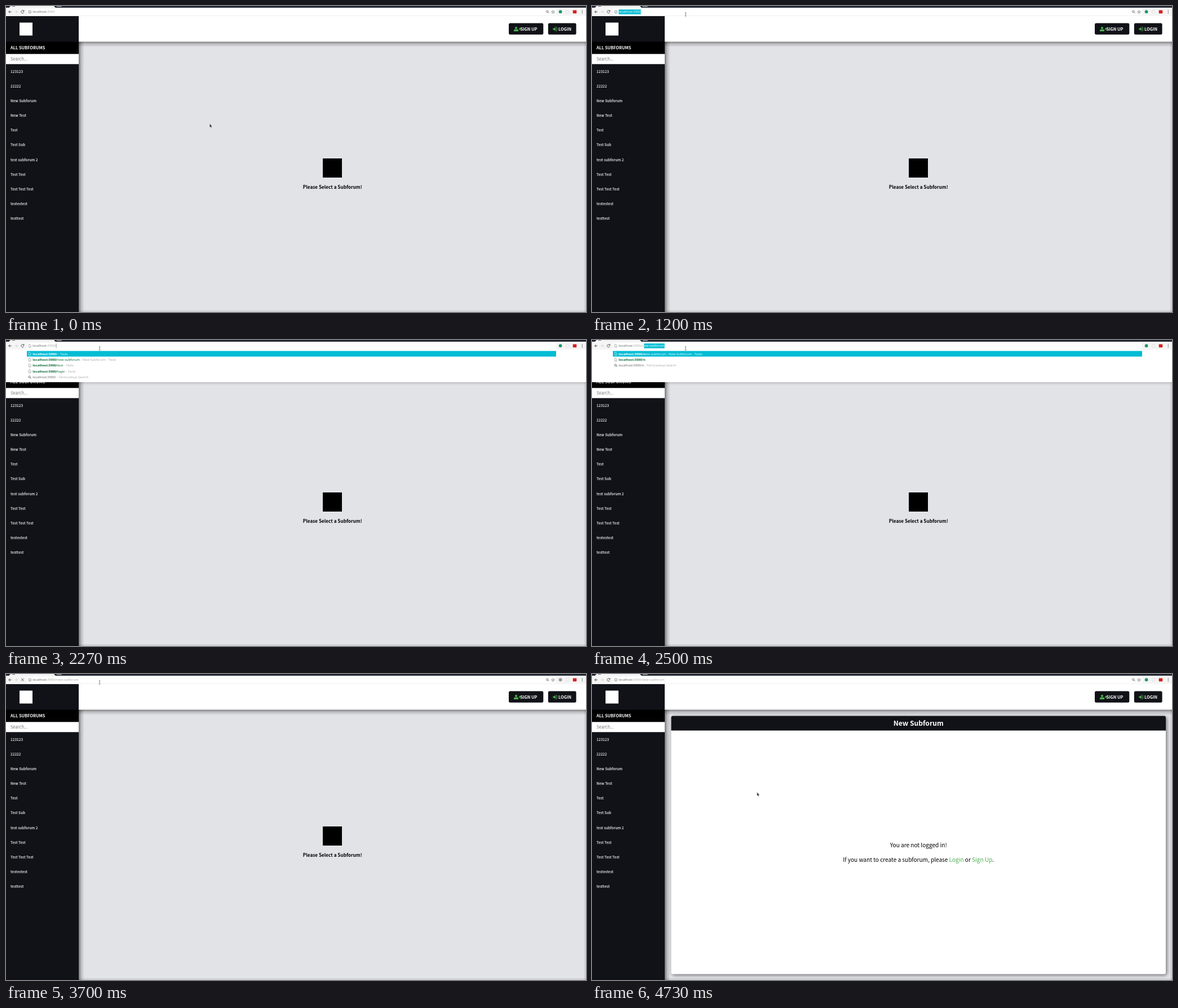
Animation, 1029 px wide and 544 px high, one loop 5.36 s. Source, as an HTML page:

```html
<!DOCTYPE html>
<html lang="en">
<head>
<meta charset="utf-8">
<title>Subforum browsing</title>
<style>
  html, body { margin: 0; width: 100%; height: 100%; overflow: hidden; background: #e2e3e7; }
  svg { display: block; width: 100%; height: 100%; }
  text { white-space: pre; }
  .page { font-family: "Noto Sans CJK JP", "Noto Sans CJK SC", "Noto Sans", sans-serif; }
  .ui { font: 5.8px "Noto Sans", "Open Sans", sans-serif; }
  .bold { font-weight: 600; }
  .line { fill: none; stroke: #555; stroke-width: .8; }
  .green { fill: #4caf50; }
</style>
</head>
<body>
<svg viewBox="0 0 1029 544" preserveAspectRatio="none">
  <defs>
    <linearGradient id="fadeRight">
      <stop stop-color="#000" stop-opacity=".48"/>
      <stop offset=".45" stop-color="#000" stop-opacity=".17"/>
      <stop offset="1" stop-color="#000" stop-opacity="0"/>
    </linearGradient>
    <linearGradient id="fadeDown" href="#fadeRight" x2="0" y2="1"/>
    <g id="doc"><path class="line" d="M40.6 -2.6h2l1.4 1.4v3.8h-3.4z" style="stroke:inherit;stroke-width:.6"/></g>
    <g id="lens" class="line"><circle cx="41.6" cy="-.5" r="1.7"/><path d="M42.8 .7l1.9 1.9"/></g>
  </defs>

  <g class="page">
    <rect width="1029" height="544" fill="#e2e3e7"/>
    <rect x="1026" y="63" width="3" height="481" opacity=".08"/>
    <rect x="129" y="541" width="900" height="3" opacity=".08"/>
    <rect x="129" y="63" width="10" height="481" fill="url(#fadeRight)"/>
    <rect x="129" y="63" width="900" height="10" fill="url(#fadeDown)"/>

    <g id="home" class="bold">
      <rect x="562" y="271" width="34" height="34"/>
      <text x="579.2" y="325" font-size="8.2" text-anchor="middle">Please Select a Subforum!</text>
    </g>

    <g id="create" text-anchor="middle">
      <rect x="140.5" y="74.5" width="877.5" height="459" rx="3" fill="#fff"
            style="filter:drop-shadow(2px 2px 3px rgba(0,0,0,.5))"/>
      <path d="M140.5 100.5v-23q0-3 3-3h871.500q3 0 3 3v23z" fill="#111217"/>
      <text class="bold" x="579.2" y="92.2" font-size="12.1" fill="#fff">New Subforum</text>
      <g font-size="10.05">
        <text x="579.2" y="308">You are not logged in!</text>
        <text x="579.2" y="333.8">If you want to create a subforum, please <tspan class="green">Login</tspan> or <tspan class="green">Sign Up</tspan>.</text>
      </g>
    </g>

    <rect x="129" y="18" width="900" height="45.500" fill="#fff"/>
    <g class="bold" font-size="7.4" fill="#fff">
      <rect x="892" y="30.500" width="61.300" height="20.300" rx="2.500" fill="#111217"/>
      <rect x="961.800" y="30.500" width="49.800" height="20.300" rx="2.500" fill="#111217"/>
      <text x="912.4" y="43.700">SIGN UP</text>
      <text x="980" y="43.700">LOGIN</text>
      <g class="green">
        <circle cx="905" cy="39" r="2.100"/>
        <path d="M900.900 45v-1.500q0-2 2-2h4.200q2 0 2 2v1.500zM911.300 38.500h1.300v1.600h1.600v1.300h-1.600v1.600h-1.300v-1.600h-1.600v-1.300h1.600z"/>
        <path d="M970.300 39.700h2.500v-2l3.200 3.300-3.200 3.300v-2h-2.500z"/>
      </g>
      <path d="M974.700 37.700h1.700q1 0 1 1v4.600q0 1-1 1h-1.700" fill="none" stroke="#4caf50" stroke-width="1"/>
    </g>

    <rect y="18" width="129" height="526" fill="#111217"/>
    <rect x="24" y="29.500" width="23" height="23" fill="#fff"/>
    <g id="sidebar">
      <rect y="63.500" width="129" height="22"/>
      <text class="bold" x="8" y="77" font-size="7.37" fill="#fff">ALL SUBFORUMS</text>
      <rect y="85.300" width="129" height="18" fill="#fff"/>
      <text x="8" y="96.800" font-size="7.5" fill="#757575">Search...</text>
      <g id="items" class="bold" font-size="6.28" fill="#d4d5d8"></g>
    </g>
    <g id="loader" fill="#fff"></g>
  </g>

  <g class="ui">
    <rect width="1029" height="3.200" fill="#222731"/>
    <path d="M5 3.200l3-3.200h77l3 3.200z" fill="#f4f4f5"/>
    <rect x="11" width="5" height="1" fill="#666"/>
    <path d="M89 0h9l1.500 1.200h-9z" fill="#b8bbc0"/>
    <rect y="3" width="1029" height="15" fill="#f5f5f6"/>
    <rect x="37" y="4.800" width="939" height="11.400" rx="1" fill="#fff"/>
    <g class="line">
      <path d="M9.800 10.400h-5m2.500-2.500l-2.500 2.500 2.500 2.500" style="stroke:#333"/>
      <path d="M15.500 10.400h5m-2.500-2.500l2.500 2.500-2.500 2.500" style="stroke:#ccc"/>
      <path id="reload" d="M31.500 9a2.500 2.500 0 1 0 .1 2.400M31.900 7.500v2h-2" style="stroke:#333"/>
      <path id="stop" d="M27 8l4.600 4.600m0-4.600l-4.600 4.600" style="stroke:#333"/>
    </g>
    <g id="idleIcons" class="line">
      <g style="stroke-width:.6"><circle cx="42.300" cy="10.400" r="2.500"/><path d="M42.300 10v1.900m0-3.200v.6"/></g>
      <use href="#lens" x="918.700" y="10.300"/>
      <path d="M970.500 7.700l.8 1.900 2 .1-1.600 1.300.6 2-1.800-1.100-1.800 1.100.6-2-1.600-1.300 2-.1z" style="stroke-width:.6"/>
    </g>
    <use id="docIcon" href="#doc" y="10.400" stroke="#777"/>
    <circle id="extension" cx="983.600" cy="10.200" r="2.900"/>
    <rect x="993.700" y="7.800" width="5" height="5" rx="1" fill="none" stroke="#ddd" stroke-width=".8"/>
    <rect x="1005.700" y="7.500" width="6.600" height="5.700" rx=".8" fill="#d8201f"/>
    <path d="M1022.300 7.600v1.200m0 1v1.200m0 1v1.200" stroke="#555" stroke-width="1.200"/>

    <g id="dropdown">
      <rect id="shade" width="1029" height="6" fill="url(#fadeDown)" opacity=".35"/>
      <rect id="sheet" y="17" width="1029" fill="#fff"/>
      <g id="rows"></g>
    </g>

    <rect id="selection" y="6.200" height="8.500" fill="#00bcd4"/>
    <text id="address" x="47.300" y="12.300"></text>
    <rect id="caret" y="6.600" width=".5" height="7.800" fill="#333"/>
  </g>

  <path id="arrow" d="M.3 .3v6.500l1.500-1.300 1 2.200 1.200-.6-1-2.100h1.900z" fill="#333" stroke="#fff" stroke-width=".35"/>
  <path id="beam" d="M164.900 11.700q1.200 0 1.200 .8 0-.8 1.200-.8M166.100 12.300v5.300M164.900 18.200q1.200 0 1.200-.8 0 .8 1.200 .8" fill="none" stroke="#333" stroke-width=".6"/>
</svg>

<script>
const LOOP = 5360;
const HOST = "localhost", PORT = ":3000", PATH = "/new-subforum", SITE = "Tavlo";
const KEYS = [[2270, 1], [2470, 2], [2570, 3], [2630, 4], [2830, 5]];  // time, typed path length
const ROW_HEIGHT = 10.4;

const el = id => document.getElementById(id);
const show = (id, on) => el(id).style.display = on ? "" : "none";
const set = (id, attrs) => { for (const key in attrs) el(id).setAttribute(key, attrs[key]); };
const span = (text, fill, style = "") => `<tspan fill="${fill}" class="${style}">${text}</tspan>`;
const progress = (t, from, to) => Math.min(1, Math.max(0, (t - from) / (to - from)));
const ease = p => p * p * (3 - 2 * p);

el("items").innerHTML = ["123123", "22222", "New Subforum", "New Test", "Test", "Test Sub",
  "test subforum 2", "Test Test", "Test Test Test", "testestest", "testtest"]
  .map((name, i) => `<text x="8" y="${118.6 + i * 26.16}">${name}</text>`).join("");

el("loader").innerHTML = [0, 1, 2, 3, 4]
  .map(i => `<rect x="${44.1 + i * 9.05}" width="4.500" rx="2.200"/>`).join("");

function suggestions(length) {
  const typed = HOST + PORT + PATH.slice(0, length);
  const search = { typed, title: " - FernLookup Search", search: true };
  if (length > 1) return [
    { typed, rest: PATH.slice(length), title: ` - New Subforum - ${SITE}` }, { typed }, search];
  return [{ typed, title: ` - ${SITE}` },
    { typed, rest: "new-subforum", title: ` - New Subforum - ${SITE}` },
    { typed, rest: "test", title: ` - ${SITE}` },
    { typed, rest: "login", title: ` - ${SITE}` }, search];
}

function rowMarkup({ typed, rest = "", title = "", search }, i) {
  const y = 24.5 + i * ROW_HEIGHT, active = i === 0;
  const link = active ? "#fff" : search ? "#666" : "#0b6b3a";
  const muted = active ? "#e6fafd" : "#aaa";
  return (active ? `<rect x="37" y="19.500" width="939" height="10" fill="#00bcd4"/>` : "") +
    `<use href="#${search ? "lens" : "doc"}" y="${y}" stroke="${active ? "#fff" : "#777"}"/>` +
    `<text x="47.300" y="${y + 2}">${span(typed, link, search ? "" : "bold")}` +
    `${span(rest, active ? muted : link)}${span(title, muted)}</text>`;
}

let shownLength = -1;
function drawDropdown(t, length) {
  const open = length > 0;
  show("dropdown", open);
  if (!open) return;
  if (length !== shownLength) {
    el("rows").innerHTML = suggestions(length).map(rowMarkup).join("");
    shownLength = length;
  }
  const bottom = 75 - 2 * ROW_HEIGHT * ease(progress(t, 2500, 2670));
  set("sheet", { height: bottom - 17 });
  set("shade", { y: bottom });
}

function drawAddress(t, length) {
  const loaded = t >= 3630, allSelected = t >= 1200 && t < 1970;
  const typed = loaded ? PATH : PATH.slice(0, length);
  const completion = length > 1 ? PATH.slice(length) : "";
  const address = el("address");
  address.innerHTML = span(HOST, allSelected ? "#fff" : "#666") +
    span(PORT + typed, allSelected ? "#fff" : "#aaa") + span(completion, "#fff");

  const fixed = HOST.length + PORT.length + typed.length;
  const end = 47.3 + address.getComputedTextLength();
  const start = allSelected ? 47.3 : 47.3 + address.getSubStringLength(0, fixed);
  set("selection", { x: start, width: Math.max(0, end - start) });
  set("caret", { x: start });
  show("caret", (t >= 1070 && t < 1200) || (t >= 1970 && t < 2470));
}

function drawLoader(t) {
  show("loader", t >= 3830 && t < 4000);
  [...el("loader").children].forEach((bar, i) => {
    const p = progress(t - 3830 - i * 100, 40, 540);
    const height = 36 * (1 - .6 * (1 - (1 - p) ** 3));
    bar.setAttribute("y", 304 - height / 2);
    bar.setAttribute("height", height);
  });
}

function drawPointer(t) {
  const beam = t >= 870 && t < 4430;
  show("beam", beam);
  show("arrow", !beam);
  const [from, to, p] = t < 870
    ? [[361, 209], [167, 16], ease(progress(t, 270, 830))]
    : [[166, 16], [292.4, 210], ease(progress(t, 4400, 4730))];
  const [x, y] = from.map((v, i) => v + (to[i] - v) * p);
  set("arrow", { transform: `translate(${x} ${y})` });
}

function draw(t) {
  const length = t < 3630 ? KEYS.reduce((n, [time, count]) => t >= time ? count : n, 0) : 0;
  const created = t >= 3830, loading = t >= 3630 && t < 4100;
  show("home", !created);
  show("create", created);
  show("sidebar", t < 3830 || t >= 4000);
  show("reload", !loading);
  show("stop", loading);
  show("idleIcons", !length);
  show("docIcon", length);
  set("extension", { fill: t >= 3630 && t < 4200 ? "#999" : "#22966b" });
  drawDropdown(t, length);
  drawAddress(t, length);
  drawLoader(t);
  drawPointer(t);
}

const began = performance.now();
function tick() {
  draw((performance.now() - began) % LOOP);
  requestAnimationFrame(tick);
}
tick();
</script>
</body>
</html>
```
